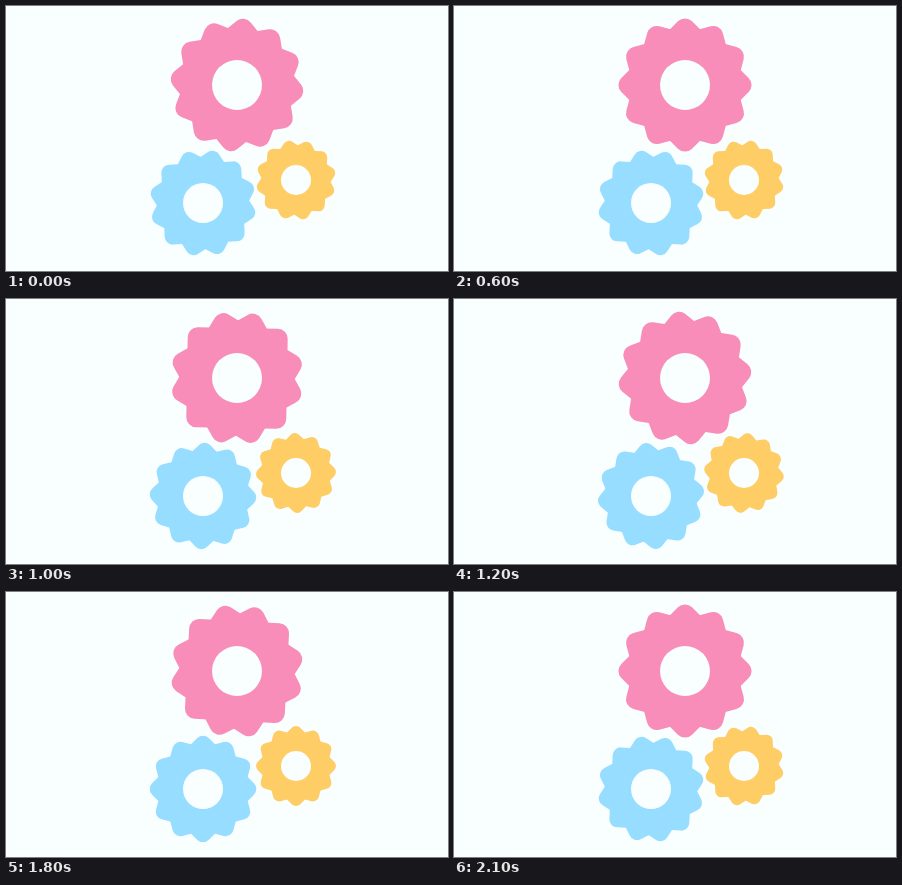
Animation, 442 px wide and 265 px high, one loop 2200 ms. Source, as an HTML page:

```html
<!DOCTYPE html>
<html lang="en">
<head>
<meta charset="utf-8">
<title>Gears</title>
<style>
  html, body { margin: 0; width: 100%; height: 100%; overflow: hidden; background: #f9feff; }
  svg { display: block; width: 442px; height: 265px; }
</style>
</head>
<body>
<svg id="stage" viewBox="0 0 442 265"></svg>
<script>
const LOOP = 2200, STEP = 100, DEGREES_PER_STEP = 4;
const BACKGROUND = '#f9feff';
const stage = document.getElementById('stage');

function add(parent, tag, attributes) {
  const node = document.createElementNS('http://www.w3.org/2000/svg', tag);
  for (const [key, value] of Object.entries(attributes)) node.setAttribute(key, value);
  return parent.appendChild(node);
}

// Three rounded squares, 30 degrees apart, give twelve teeth.
function makeGear({ x, y, size, hole, color, start, direction }) {
  const place = add(stage, 'g', { transform: `translate(${x} ${y})` });
  const wheel = add(place, 'g', { fill: color });
  for (const turn of [0, 30, 60]) {
    add(wheel, 'rect', {
      x: -size / 2, y: -size / 2, width: size, height: size,
      rx: size / 10, transform: `rotate(${45 + turn})`
    });
  }
  add(place, 'circle', { r: hole, fill: BACKGROUND });
  return { wheel, start, direction };
}

const gears = [
  { x: 231, y: 79, size: 100, hole: 25, color: '#f98db9', start: 6, direction: 1 },
  { x: 197, y: 197, size: 80, hole: 20, color: '#97ddff', start: 12, direction: -1 },
  { x: 290, y: 174, size: 60, hole: 15, color: '#ffcd66', start: -12, direction: 1 }
].map(makeGear);

function render(time) {
  const turned = Math.floor((time % LOOP) / STEP) * DEGREES_PER_STEP;
  for (const { wheel, start, direction } of gears) {
    wheel.setAttribute('transform', `rotate(${start + direction * turned})`);
  }
}

const begin = performance.now();
function tick() {
  render(performance.now() - begin);
  requestAnimationFrame(tick);
}
render(0);
requestAnimationFrame(tick);
</script>
</body>
</html>
```
